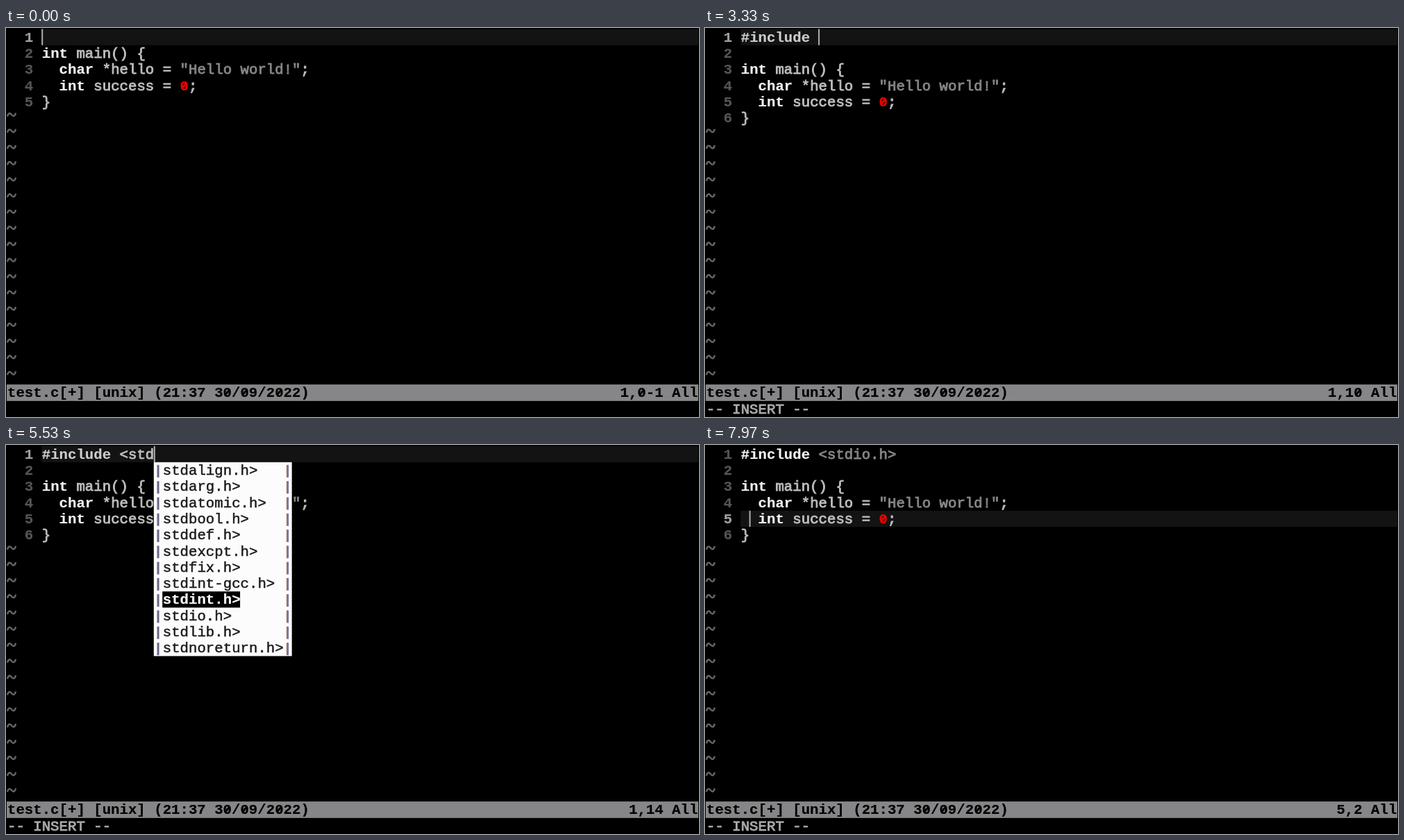
An HTML page for the animation above (8 s loop, 998 by 561 pixels).

```html
<!DOCTYPE html>
<html lang="en">
<head>
<meta charset="utf-8">
<title>Editor session</title>
<style>
  html, body { margin: 0; width: 100%; height: 100%; overflow: hidden; background: #000; }
  svg { display: block; width: 100vw; height: 100vh; background: #000; }
  text {
    font-family: "Liberation Mono", "DejaVu Sans Mono", monospace;
    font-size: 20.71px;
    white-space: pre;
    fill: currentColor;
    stroke: currentColor;
    stroke-width: .9px;
  }
  path { fill: none; stroke: currentColor; stroke-width: 2.4px; }
  .plain  { color: #bdbdbd; }
  .string { color: #868686; }
  .mode   { color: #a8a8a8; }
  .tilde  { color: #666; }
  .item   { color: #1c1c1c; stroke-width: .5px; }
  .word, .typed, .number, .gutter, .here, .status, .picked { font-weight: bold; stroke-width: .2px; }
  .word   { color: #f4f4f4; }
  .typed  { color: #ccc; }
  .number { color: #e00; }
  .gutter { color: #555; }
  .here   { color: #a0a0a0; }
  .status { color: #000; }
  .picked { color: #fff; }
  path.slash { stroke-width: 2.6px; }
</style>
</head>
<body>
<svg id="stage" viewBox="0 0 998 561"></svg>
<script>
const NS = "http://www.w3.org/2000/svg";
const stage = document.getElementById("stage");
const LOOP = 8000, COLS = 80, GUTTER = 4, STATUS_ROW = 22;
const CW = 12.43, RH = 23.3, PAD = 1.5;

const INCLUDE = "#include ";
const HEADERS = ("stdalign stdarg stdatomic stdbool stddef stdexcpt stdfix stdint-gcc stdint " +
  "stdio stdlib stdnoreturn sti stierr stireg stllock stm storage")
  .split(" ").map(name => name + ".h>");

const PROGRAM = [
  [["int", "word"], [" main() {", "plain"]],
  [["  char", "word"], [" *hello = ", "plain"], ['"Hello world!"', "string"], [";", "plain"]],
  [["  int", "word"], [" success = ", "plain"], ["0", "number"], [";", "plain"]],
  [["}", "plain"]]
];

// Key times in ms
const OPEN_LINE = 700, ACCEPT = 6050, LEAVE = 6400, MOVE = 6900;
const KEYS = [
  ...Array.from("#include", (c, i) => 1560 + i * 190),
  3270, 3560, 3770, 3990, 4400
];
const FIRST_DOWN = 4640, DOWN_STEP = 118, DOWNS = 9;

const x = col => PAD + col * CW;
const y = row => PAD + row * RH;
const clamp = (v, lo, hi) => Math.min(hi, Math.max(lo, v));

function add(tag, attrs, content) {
  const el = document.createElementNS(NS, tag);
  for (const name in attrs) el.setAttribute(name, attrs[name]);
  if (content !== undefined) el.textContent = content;
  stage.appendChild(el);
}

const box = (left, top, width, height, fill) =>
  add("rect", { x: left, y: top, width, height, fill });

const stroke = (d, cls) => add("path", { d, class: cls });

// Zeros carry a slash
function write(row, col, str, cls) {
  const left = x(col) + .5, base = y(row) + 18.2;
  add("text", { x: left, y: base, class: cls }, str);
  [...str].forEach((c, i) => {
    if (c === "0") stroke(`M${left + i * CW + 3.6} ${base - 3.4}l5.2 -7`, cls + " slash");
  });
}

const tilde = row =>
  stroke(`M2 ${y(row) + 9.5}c1.5 -6 4 -5 6 -2.5s4.5 3.5 6 -2.5`, "tilde");

function writeRuns(row, runs) {
  let col = GUTTER;
  for (const [str, cls] of runs) {
    write(row, col, str, cls);
    col += str.length;
  }
}

function stateAt(t) {
  const insert = t >= OPEN_LINE;
  const typed = KEYS.filter(k => k <= t).length;
  const done = t >= ACCEPT;
  const s = {
    insert, done,
    text: done ? INCLUDE + "<stdio.h>" : (INCLUDE + "<std").slice(0, typed),
    line: 0, cursor: true, pick: -1
  };
  s.col = s.text.length;
  s.ruler = insert ? "1," + (s.col + 1) : "1,0-1";
  if (!done && typed >= 12)
    s.pick = clamp(Math.floor((t - FIRST_DOWN) / DOWN_STEP) + 1, 0, DOWNS);
  if (t >= LEAVE) {
    s.cursor = false;
    s.ruler = "1,19-18";
  }
  if (t >= MOVE) {
    s.cursor = true;
    s.line = clamp(Math.floor((t - MOVE) / 130) + 1, 1, 4);
    s.col = s.line === 1 ? 0 : 1;
    s.ruler = (s.line + 1) + "," + (s.col + 1);
  }
  return s;
}

function topLine(s) {
  const word = s.text.slice(0, 8), rest = s.text.slice(8);
  return s.done
    ? [[word, "word"], [rest, "string"]]
    : [[word, "typed"], [rest, "plain"]];
}

function drawPopup(s) {
  const prefix = s.text.slice(INCLUDE.length + 1);
  const items = HEADERS.filter(h => h.startsWith(prefix));
  const left = GUTTER + s.col, width = 16;
  box(x(left), y(1), width * CW, items.length * RH, "#fcfcfc");
  items.forEach((item, i) => {
    const row = i + 1, picked = i === s.pick;
    for (const col of [left, left + width - 1]) {
      box(x(col + .5) - 1.5, y(row) + 4, 1.5, 18, "#8c6262");
      box(x(col + .5), y(row) + 4, 1.5, 18, "#66608c");
    }
    if (picked) box(x(left + 1), y(row), item.length * CW, RH, "#000");
    write(row, left + 1, item, picked ? "picked" : "item");
  });
}

function draw(s) {
  stage.textContent = "";
  const lines = s.insert ? [topLine(s), [], ...PROGRAM] : [[], ...PROGRAM];

  box(x(GUTTER), y(s.line), 997 - x(GUTTER), RH, "#131313");
  lines.forEach((runs, row) => {
    write(row, 2, String(row + 1), row === s.line ? "here" : "gutter");
    writeRuns(row, runs);
  });
  for (let row = lines.length; row < STATUS_ROW; row++) tilde(row);

  if (s.pick >= 0) drawPopup(s);
  if (s.cursor) box(x(GUTTER + s.col), y(s.line), 2, RH, "#b0b0b0");

  box(1, y(STATUS_ROW), 996, RH + .5, "#868688");
  write(STATUS_ROW, 0, "test.c[+] [unix] (21:37 30/09/2022)", "status");
  const ruler = s.ruler + " All";
  write(STATUS_ROW, COLS - ruler.length, ruler, "status");
  if (s.insert) write(STATUS_ROW + 1, 0, "-- INSERT --", "mode");
}

let shown = "";
function tick() {
  const s = stateAt(performance.now() % LOOP);
  const key = JSON.stringify(s);
  if (key !== shown) {
    draw(s);
    shown = key;
  }
  requestAnimationFrame(tick);
}
tick();
</script>
</body>
</html>
```
